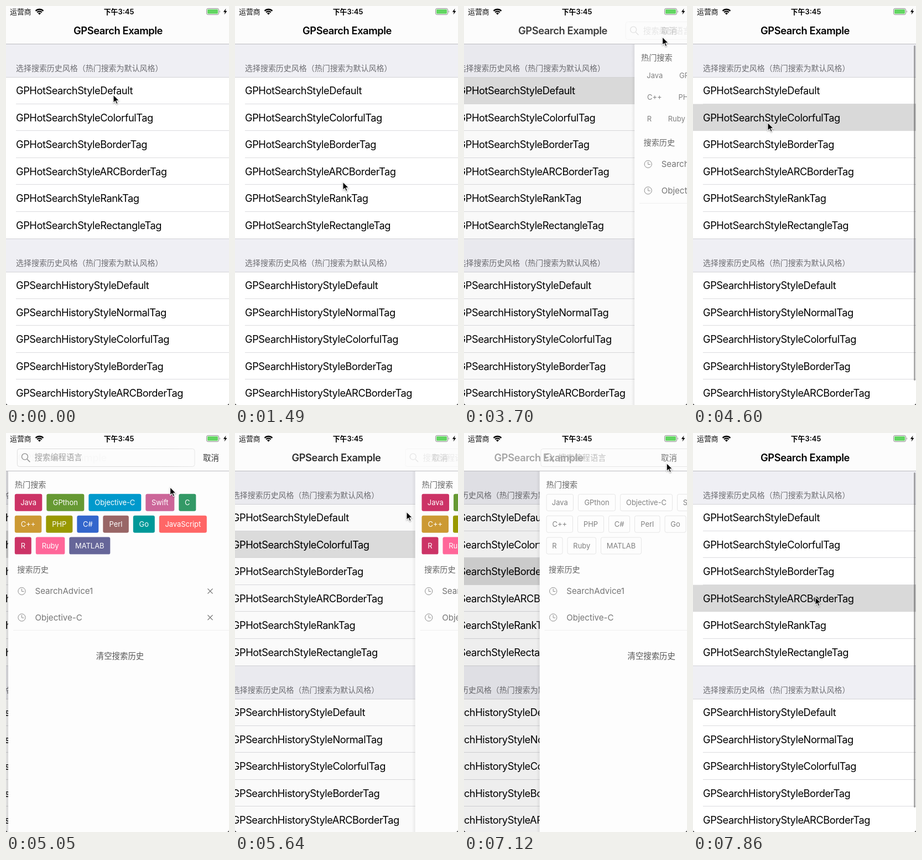
Write an HTML page that moves like this. It is 403 by 719 pixels and loops after 8000 ms.

```html
<!DOCTYPE html>
<html lang="zh">
<head>
<meta charset="utf-8">
<title>GPSearch Example</title>
<style>
  html, body { margin: 0; width: 100%; height: 100%; overflow: hidden; background: #fff; }
  svg { display: block; width: 100%; height: 100%; font-family: Inter, "Noto Sans CJK SC", "Noto Sans CJK", sans-serif; }
  .row { letter-spacing: -.48px; }
  .title { letter-spacing: -.4px; }
</style>
</head>
<body>
<svg id="stage" viewBox="0 0 403 719"></svg>
<script>
const W = 403, H = 719, LOOP = 8000;
const stage = document.getElementById('stage');

// y is the optical middle of the line
const text = (x, y, s, size, fill, extra = '') =>
  `<text x="${x}" y="${y + size * .365}" font-size="${size}" fill="${fill}" ${extra}>${s}</text>`;
const rect = (x, y, w, h, fill, extra = '') =>
  `<rect x="${x}" y="${y}" width="${w}" height="${h}" fill="${fill}" ${extra}/>`;
const path = (d, extra) => `<path d="${d}" ${extra}/>`;
const stroke = (color, width = 1) => `fill="none" stroke="${color}" stroke-width="${width}"`;

// List of styles
const ROW = 48.55, FIRST = 128.5;
const hotRows = ['Default', 'ColorfulTag', 'BorderTag', 'ARCBorderTag', 'RankTag', 'RectangleTag'];
const historyRows = ['Default', 'NormalTag', 'ColorfulTag', 'BorderTag', 'ARCBorderTag'];

function section(top, prefix, names) {
  const rows = names.map((name, i) => {
    const y = top + i * ROW;
    const line = i ? rect(18, Math.floor(y) - 1, W - 18, 1, '#dbdbde') : '';
    return line + text(18, y + 24, prefix + name, 18.27, '#000', 'class="row"');
  }).join('');
  return rect(0, top - 59.5, W, 59.5, '#efeff4') +
    text(18, top - 16.5, '选择搜索历史风格（热门搜索为默认风格）', 13.97, '#6d6d72') +
    rect(0, Math.floor(top), W, 1, '#d3d3d7') + rows;
}

const list = `<g id="list">${rect(0, 69, W, H, '#fff')}
  ${section(FIRST, 'GPHotSearchStyle', hotRows)}
  ${rect(0, 419, W, 1, '#d3d3d7')}
  ${section(479.5, 'GPSearchHistoryStyle', historyRows)}
  <g id="mark">${rect(0, 0, W, ROW, '#d9d9d9')}</g>
  <text id="markText" class="row" x="18" font-size="18.27"></text>
  ${rect(399, 71, 3, 604, '#000', 'id="bar" rx="1.5"')}
  ${rect(0, 69, W, H, '#000', 'id="dim"')}</g>`;

// Search page
const tagRows = [
  [['Java', 49.5, '#cc3366'], ['GPthon', 68, '#669933'], ['Objective-C', 95, '#0099cc'], ['Swift', 52, '#cc6699'], ['C', 31, '#339966']],
  [['C++', 48.5, '#cc9933'], ['PHP', 48, '#999900'], ['C#', 39, '#3366cc'], ['Perl', 46.5, '#996666'], ['Go', 39, '#009999'], ['JavaScript', 86, '#ff6666']],
  [['R', 30, '#cc3366'], ['Ruby', 52.5, '#ff6699'], ['MATLAB', 74, '#666699']]
];

function tags(style) {
  return tagRows.map((row, r) => {
    let x = 11.8;
    return row.map(([name, w, color]) => {
      const y = 125.3 + r * 38.9;
      const box = style === 1 ? rect(x, y - 15.5, w, 31, color, 'rx="3.2"')
        : style === 2 ? rect(x + .5, y - 15, w - 1, 30, 'none', 'rx="3" stroke="#e6e6e6"') : '';
      const label = text(x + w / 2, y, name, 12.9, style === 1 ? '#fff' : '#808080', 'text-anchor="middle"');
      x += w + 8;
      return box + label;
    }).join('');
  }).join('');
}

const historyItem = (y, name) =>
  `<circle cx="24.5" cy="${y}" r="6.6" ${stroke('#8c8c8c')}/>` +
  path(`M24.5 ${y - 4.5}v5h4`, stroke('#8c8c8c')) +
  text(48.5, y, name, 15.05, '#757575') +
  path(`M360.5 ${y - 4.5}l9 9m0-9l-9 9`, stroke('#777', 1.1));

const page = `<g id="page">${rect(-6, 69, 6, H, 'url(#edge)')}${rect(0, 69, W, H, '#fdfdfd')}
  ${text(11.8, 93, '热门搜索', 14.2, '#666')}
  ${[0, 1, 2].map(s => `<g class="tags">${tags(s)}</g>`).join('')}
  ${text(16.3, 245.5, '搜索历史', 14.2, '#666')}
  ${historyItem(285, 'SearchAdvice1')}${historyItem(332.5, 'Objective-C')}
  ${rect(9, 355, W - 9, 1, '#efefef')}
  ${text(202, 402, '清空搜索历史', 14.4, '#555', 'text-anchor="middle"')}</g>`;

// Bars
const nav = `${rect(0, 0, W, 68, '#fcfcfc')}${rect(0, 68, W, 1, '#bcbcc0')}
  <g id="title">${text(202.5, 44.5, 'GPSearch Example', 18.27, '#000', 'class="title" font-weight="600" text-anchor="middle"')}</g>
  <g id="search">
    <rect id="field" y="28.5" height="32" rx="4" ${stroke('url(#border)')}/>
    <g id="lens">${path('M34.6 47.2l5 5', stroke('#8a8a8a', 1.5))}<circle cx="30.3" cy="42.7" r="5.5" ${stroke('#8a8a8a', 1.3)}/></g>
    <g id="hint" clip-path="url(#hintClip)">${text(48, 44.3, '搜索编程语言', 14.4, '#a0a0a0')}</g>
  </g>
  <g id="cancel">${text(356, 44.5, '取消', 14.4, '#333')}</g>`;

const wave = r => {
  const d = r * .707;
  return path(`M${60.5 - d} ${15.8 - d}A${r} ${r} 0 0 1 ${60.5 + d} ${15.8 - d}`, stroke('#000', 2.3));
};
const status = text(7, 10.3, '运营商', 12.9, '#111') +
  wave(9.8) + wave(6.1) + path('M60.5 15.8l-2.6-2.6a3.7 3.7 0 0 1 5.2 0z', '') +
  text(204, 10.3, '下午3:45', 12.9, '#000', 'font-weight="600" text-anchor="middle"') +
  rect(362.5, 4.5, 22, 11, 'none', 'rx="2.6" stroke="#8a8a8a"') +
  rect(364, 6, 19, 8, '#63d663', 'rx="1.4"') +
  path('M386 8q2 2 0 4z', 'fill="#8a8a8a"') +
  path('M397.6 4.5l-4.8 6.3h3l-1.2 4.7 4.8-6.4h-3z', '');

const cursor = `<g id="cursor">${path('M0 0V14.6L3.4 11.5 5.7 16.8 8.1 15.8 5.9 10.6H10.6Z',
  'stroke="#fff" stroke-width="1.1" filter="drop-shadow(0 1px 1px rgba(0,0,0,.35))"')}</g>`;
const corners = path(`M0 ${H - 4}q0 4 4 4H0zM${W} ${H - 4}q0 4-4 4h4z`, 'fill="#111"');

const defs = `<defs>
  <linearGradient id="edge"><stop stop-opacity="0"/><stop offset="1" stop-opacity=".07"/></linearGradient>
  <linearGradient id="border"><stop offset=".85" stop-color="#dcdcdc"/><stop id="borderEnd" offset="1" stop-color="#dcdcdc"/></linearGradient>
  <clipPath id="hintClip"><rect id="hintBox" x="46" y="30" height="30"/></clipPath></defs>`;

stage.innerHTML = defs + list + page + nav + status + corners + cursor;

const el = {};
stage.querySelectorAll('[id]').forEach(n => el[n.id] = n);
const tagGroups = stage.querySelectorAll('.tags');

// Timeline
const visits = [
  { row: 0, press: 2075, push: 2382, pop: 3560 },
  { row: 1, press: 4440, push: 4680, pop: 5469 },
  { row: 2, press: 6200, push: 6380, pop: 7050 },
  { row: 3, press: 7790, push: Infinity, pop: Infinity }
];
const pointer = [
  [0, 194, 160], [830, 194, 160], [1490, 195, 317], [1930, 189.5, 144], [2230, 189, 149.5], [2680, 189, 149.5],
  [3350, 370, 48], [3600, 370, 48], [4440, 135, 210], [4690, 135, 210], [5250, 368, 48], [5460, 368, 48],
  [5636, 310, 142], [6050, 200, 250], [6290, 200, 250], [6520, 357, 104], [6700, 370, 48], [7060, 370, 48],
  [7650, 221, 295.5], [8000, 221, 295.5]
];

const clamp = v => Math.max(0, Math.min(1, v));
const move = (n, x, y = 0) => n.setAttribute('transform', `translate(${x} ${y})`);
const fade = (n, v) => n.setAttribute('opacity', v);

// Critically damped slide
function spring(ms) {
  if (!(ms > 0)) return 0;
  const k = ms * .01826;
  return 1 - (1 + k) * Math.exp(-k);
}

function pointerAt(t) {
  const i = Math.max(1, pointer.findIndex(p => p[0] >= t));
  const [t0, x0, y0] = pointer[i - 1], [t1, x1, y1] = pointer[i];
  const u = clamp((t - t0) / (t1 - t0)), e = u * u * (3 - 2 * u);
  return [x0 + (x1 - x0) * e, y0 + (y1 - y0) * e];
}

const START = 900, STEP = 148, SLACK = 12;
const sample = t => t < START - SLACK ? 0 : START + STEP * Math.floor((t - START + SLACK) / STEP);

function draw(now) {
  const t = sample(now % LOOP);
  const visit = visits.filter(v => t >= v.press).pop() || visits[0];
  const popping = t > visit.pop;
  let p = spring(t - visit.push) - spring(t - visit.pop);
  if (p < .003) p = 0;
  const x = W * (1 - p);
  const late = popping ? 0 : 1 - p;

  move(el.list, -.3 * W * p);
  fade(el.dim, .1 * p);
  move(el.page, x);
  el.page.setAttribute('visibility', p ? 'visible' : 'hidden');
  tagGroups.forEach((g, i) => g.setAttribute('display', i === visit.row ? 'inline' : 'none'));

  const top = FIRST + visit.row * ROW;
  const marked = t < visit.press ? 0 : clamp(1 - (t - visit.pop - 100) / 400);
  move(el.mark, 0, top - .5);
  fade(el.mark, marked);
  el.markText.setAttribute('y', top + 24 + 18.27 * .365);
  el.markText.textContent = marked ? 'GPHotSearchStyle' + hotRows[visit.row] : '';
  const shown = visits.some(v => t > v.pop + 400 && t < v.pop + 1900);
  fade(el.bar, shown ? .33 : 0);

  move(el.title, -102 * p);
  fade(el.title, 1 - p);
  const shift = .895 * x, left = 16.5 + shift + 27 * late;
  el.field.setAttribute('x', left);
  el.field.setAttribute('width', Math.max(0, (popping ? 341 + shift : 341) - left));
  el.borderEnd.setAttribute('stop-opacity', clamp(1 - 30 * late));
  move(el.lens, shift + 13 * late);
  move(el.hint, shift - 19 * late, -23 * late);
  el.hintBox.setAttribute('width', Math.max(0, 92 - 120 * late));
  fade(el.search, p);
  fade(el.cancel, p);

  move(el.cursor, ...pointerAt(t));
}

const begin = performance.now();
function tick() {
  draw(performance.now() - begin);
  requestAnimationFrame(tick);
}
tick();
</script>
</body>
</html>
```
